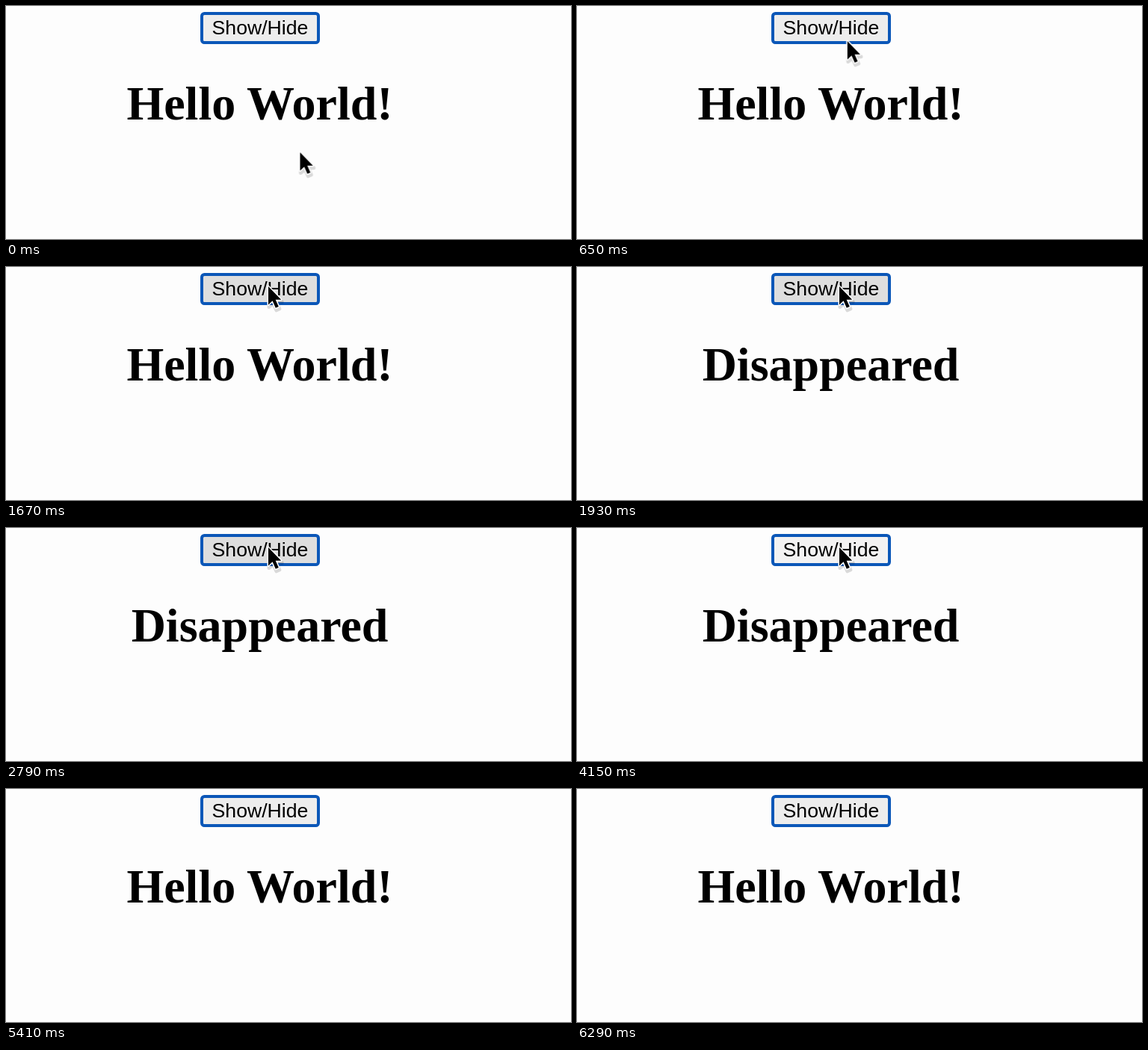
An HTML page that plays this animation: 756x312 px, repeating every 6310 ms.

```html
<!DOCTYPE html>
<html lang="en">
<head>
<meta charset="utf-8">
<title>Show/Hide</title>
<style>
  html, body { margin: 0; width: 100%; height: 100%; overflow: hidden; background: #fdfdfd; }
  svg { display: block; width: 756px; height: 312px; }
  text { text-anchor: middle; fill: #000; }
  .label { font: 26.667px "Liberation Sans", Arial, sans-serif; }
  .title { font: bold 64px "Liberation Serif", "Times New Roman", serif; }
  #gone { opacity: 0; }
</style>
</head>
<body>
<svg viewBox="0 0 756 312">
  <defs>
    <path id="arrow" d="M0 0V24.5L5.6 19.3L9.8 28.8L13.8 27L9.7 17.7H17.2Z" stroke-linejoin="round"/>
  </defs>
  <rect id="button" x="262" y="10" width="156" height="39" rx="3.5" fill="#ededed" stroke="#0b57b8" stroke-width="4"/>
  <text class="label" x="340" y="37.5">Show/Hide</text>
  <text class="title" id="hello" x="339.5" y="152">Hello World!</text>
  <text class="title" id="gone" x="339.5" y="152">Disappeared</text>
  <g id="cursor">
    <use href="#arrow" x="1" y="3" fill="none" stroke="#000" stroke-opacity=".14" stroke-width="5"/>
    <use href="#arrow" fill="#000" stroke="#fff" stroke-width="3" paint-order="stroke"/>
  </g>
</svg>
<script>
const LOOP = 6310;
const IDLE = "#ededed", HOVER = "#dedede", PRESSED = "#f3f2f2";
const $ = id => document.getElementById(id);

const run = (id, frames) =>
  $(id).animate(frames, { duration: LOOP, iterations: Infinity });

// Hard changes: each value holds until the next time.
function hold(id, prop, steps) {
  const frames = steps.map(([t, v]) => ({ offset: t / LOOP, [prop]: v, easing: "step-end" }));
  frames.push({ offset: 1, [prop]: steps.at(-1)[1] });
  run(id, frames);
}

// Pointer stops: time, x, y, easing towards the next stop.
const stops = [
  [0, 393.5, 196, "linear"],
  [270, 393.5, 196, "cubic-bezier(.45,0,.35,1)"],
  [870, 356, 20, "linear"],
  [1370, 356, 20, "ease-in-out"],
  [1550, 351, 26, "linear"],
  [4450, 351, 26, "cubic-bezier(.5,0,.8,.7)"],
  [4740, 458, -40, "linear"],
  [LOOP, 458, -40, "linear"]
];
run("cursor", stops.map(([t, x, y, easing]) =>
  ({ offset: t / LOOP, transform: `translate(${x}px, ${y}px)`, easing })));

hold("button", "fill", [
  [0, IDLE], [750, HOVER], [1690, PRESSED], [1790, HOVER],
  [4110, PRESSED], [4210, HOVER], [4850, IDLE]
]);
hold("hello", "opacity", [[0, 1], [1790, 0], [4210, 1]]);
hold("gone", "opacity", [[0, 0], [1790, 1], [4210, 0]]);
</script>
</body>
</html>
```
